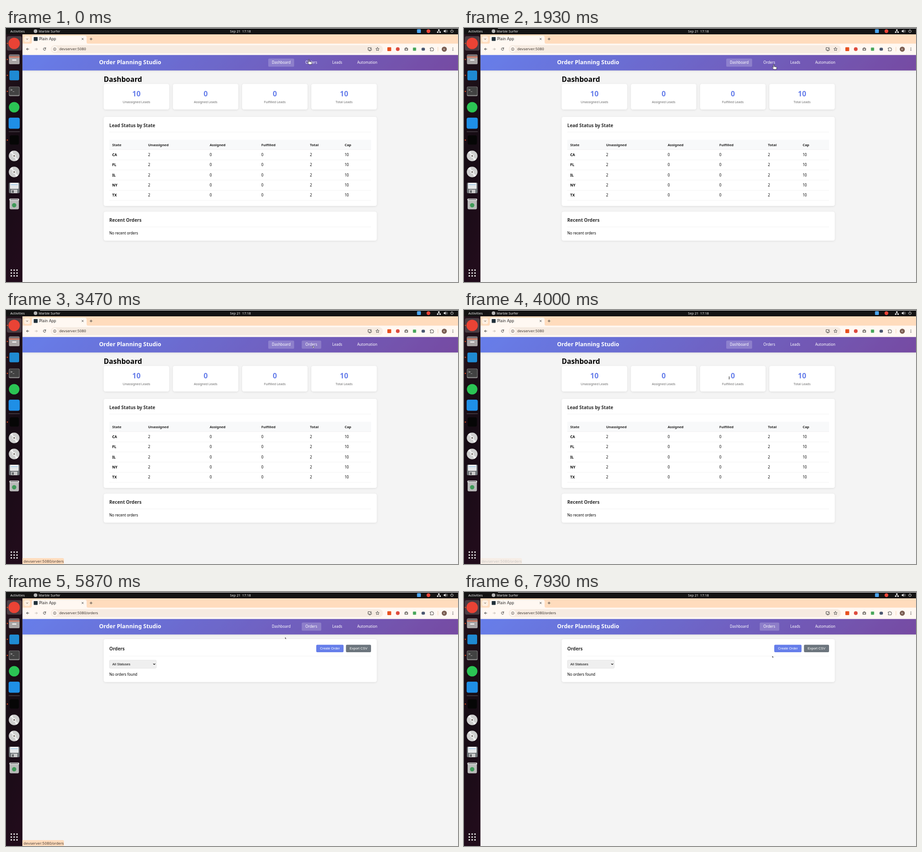
These frames come from a looping animation (998x561 px, 8 s). An HTML page:

```html
<!DOCTYPE html>
<html lang="en">
<head>
<meta charset="utf-8">
<title>Dashboard recording</title>
<style>
  html, body { margin: 0; width: 100%; height: 100%; overflow: hidden; background: #f4f4f4; }
  svg { display: block; width: 100%; height: 100%; }
  text { font-family: "Noto Sans", "Open Sans", sans-serif; white-space: pre; }
  .ui { font-family: "DejaVu Sans", sans-serif; }
  .form { font-family: "Liberation Sans", Arial, sans-serif; }
  .line { fill: none; stroke-linecap: round; stroke-linejoin: round; }
</style>
</head>
<body>
<svg id="stage" viewBox="0 0 998 561" preserveAspectRatio="none"></svg>
<script>
const HOST = 'devserver:5080';
const LOOP = 8000;
const PAGE_SWITCH = 5200;

// ---- drawing helpers ----
const rect = (x, y, w, h, fill, r = 0, extra = '') =>
  `<rect x="${x}" y="${y}" width="${w}" height="${h}" rx="${r}" fill="${fill}" ${extra}/>`;
const circle = (x, y, r, fill, extra = '') =>
  `<circle cx="${x}" cy="${y}" r="${r}" fill="${fill}" ${extra}/>`;
const line = (d, stroke, width = 1) =>
  `<path class="line" d="${d}" stroke="${stroke}" stroke-width="${width}"/>`;
const text = (x, y, size, str, fill = '#000', extra = '') =>
  `<text x="${x}" y="${y}" font-size="${size}" fill="${fill}" ${extra}>${str}</text>`;
const BOLD = 'font-weight="700"';
const MIDDLE = 'text-anchor="middle"';
const rule = y => rect(228, y, 578, 0.6, '#e9e9e9');
const card = (x, y, w, h) => rect(x, y, w, h, '#fff', 4.2, 'filter="url(#soft)"');

const defs = `<defs>
  <linearGradient id="head" gradientUnits="userSpaceOnUse" x1="268" y1="-172.5" x2="766.3" y2="325.8">
    <stop stop-color="#667eea"/><stop offset="1" stop-color="#764ba2"/></linearGradient>
  <linearGradient id="dock" x1="0" y1="0" x2="0.15" y2="1">
    <stop stop-color="#24131c"/><stop offset=".5" stop-color="#160c14"/><stop offset="1" stop-color="#210c1b"/></linearGradient>
  <filter id="soft" x="-10%" y="-20%" width="120%" height="150%">
    <feDropShadow dx="0" dy="1" stdDeviation="2.2" flood-color="#000" flood-opacity=".1"/></filter>
</defs>`;

function topBar() {
  return rect(0, 0, 998, 14, '#131313') + rect(75, 0, 923, 1, '#fff') +
    text(9.5, 9.8, 7.7, 'Activities', '#eee') +
    circle(65.2, 7, 4, '#b5b5b5') +
    text(72, 9.8, 7.4, 'Marble Surfer', '#eee') +
    text(517.5, 9.6, 7.4, 'Sep 21\u00a0 17:18', '#eee', MIDDLE) +
    rect(907.5, 2.5, 8.5, 8.5, '#4aa5ef', 1.5) + circle(932.7, 7, 4.2, '#ea4335') +
    rect(954, 3, 3.4, 2.8, '#eee') + rect(951.6, 8, 3.2, 2.6, '#eee') + rect(956.8, 8, 3.2, 2.6, '#eee') +
    line('M955.7 5.5V7M953.2 8V7H958.4V8', '#eee', 0.7) +
    `<path d="M966.5 5.4h1.8l2.3-2.2v7.4l-2.3-2.2h-1.8z" fill="#eee"/>` +
    line('M972 5.2q1.4 1.7 0 3.4M973.3 3.8q2.6 3.1 0 6.2', '#ccc', 0.7) +
    line('M982.8 4.6a3 3 0 1 0 3.6 0M984.6 3.2v3.4', '#eee', 0.9);
}

function dock() {
  const disc = y => circle(18, y, 11.8, '#cfcfcf') +
    `<path d="M18 ${y}L9 ${y - 7.5}A11.8 11.8 0 0 1 14 ${y - 11}zM18 ${y}L27 ${y + 7.5}A11.8 11.8 0 0 1 22 ${y + 11}z" fill="#eee"/>` +
    circle(18, y, 3.6, '#f3f3f3') + circle(18, y, 1.6, '#4a4038');
  let s = rect(0, 14, 36.3, 547, 'url(#dock)') +
    rect(2, 18, 32.5, 32, '#4a3d43', 4) + circle(18, 34, 12.6, '#ea4335');
  s += rect(6.5, 58.5, 23.5, 21.5, '#a9a5a5', 2.5) + rect(6.5, 58.5, 23.5, 7, '#7c7476', 2.5) +
    rect(6.5, 63, 23.5, 2.2, '#e8795a') + rect(13.5, 69.5, 9.5, 2.6, '#f2f2f2', 1);
  s += rect(7.5, 94, 21.5, 21.5, '#1f8ad2', 3);
  s += rect(6.5, 129.5, 23.5, 21, '#8c8c8c', 2.5) + rect(7.4, 130.3, 21.7, 18, '#424242', 2) +
    text(9, 138.5, 7, '&gt;_', '#f4f4f4', 'class="ui"');
  s += circle(18, 175, 11.6, '#2bc454') + rect(5.8, 198, 24.6, 24.6, '#1f8fe6', 4) +
    rect(6, 228.6, 24.5, 0.8, '#777076') + rect(8, 237, 20.5, 20.5, '#060606', 4);
  s += disc(282.5) + disc(318);
  s += rect(6.5, 341.5, 23.5, 23.5, '#6f7478', 2.5) + rect(9, 342, 18.5, 13, '#f3f3f3', 1) +
    [345.5, 348.5, 351.5].map((y, i) => rect(10.5, y, 15.5, 1, i ? '#c5cdd3' : '#5ea4d8')).join('') +
    rect(11.5, 357, 13.5, 8, '#c9c9c9') + rect(13.5, 358.5, 3.5, 5.5, '#55595c');
  s += rect(8, 379, 20.5, 21.5, '#b9bab9', 3) + rect(7.5, 376.8, 21.5, 4.4, '#e2e2e2', 1.5) +
    rect(9.5, 378, 17.5, 1.6, '#6c6c6c') + circle(18, 391.5, 4.8, '#3f9a58');
  for (const y of [34, 69.5, 104.5, 140, 247.5]) s += circle(3, y, 1.3, '#e95420');
  for (let i = 0; i < 9; i++)
    s += rect(10.2 + (i % 3) * 6.3, 533.3 + Math.floor(i / 3) * 6.4, 3, 3, '#f2f2f2', 0.7);
  return s;
}

function browser() {
  const ink = '#4a4038';
  let s = rect(36.3, 14, 961.7, 24, '#ffdcbd') + rect(36.3, 34.5, 961.7, 25, '#fff8f2') +
    rect(40, 18, 13.2, 13, '#fff0e2', 4) + line('M45 23.7l1.7 1.7l1.7-1.7', ink, 1) +
    `<path d="M53 35q4 0 4-4V21q0-4 4-4H174q4 0 4 4V31q0 4 4 4z" fill="#fff8f2"/>` +
    rect(61.2, 20, 8.6, 8.6, '#20303a', 1) +
    text(73.2, 27.1, 8, 'Plain App', '#222', 'class="ui"') +
    line('M167.5 22.6l3.4 3.4m0-3.4l-3.4 3.4M185.2 24.3h5.2M187.8 21.7v5.2', '#333', 0.9);
  s += line('M50.5 46.6H45.4m2.3-2.4l-2.4 2.4l2.4 2.4', '#333', 1) +
    line('M64 46.6h5.1m-2.3-2.4l2.4 2.4l-2.4 2.4', '#c2b8b0', 1) +
    line('M87.4 45a2.7 2.7 0 1 0 .3 2.4M87.7 43.4v1.9h-1.9', '#333', 1) +
    rect(98.8, 38, 733.5, 17.4, '#f6ebe1', 8.7) + circle(107.6, 46.7, 6.6, '#fff8f2') +
    circle(107.6, 46.7, 3, 'none', `stroke="${ink}" stroke-width=".8"`) +
    line('M107.6 46.5v1.7M107.6 45v.1', ink, 0.8) +
    `<text id="url" class="ui" x="117.7" y="49.3" font-size="7.5" fill="#3b342f"></text>` +
    line('M803.5 43.4h-4v5.4h7.6v-1.6M801.5 50.4h3.5M805.6 42.8v3.2m-1.5-1.4l1.5 1.5l1.5-1.5', '#333', 0.9) +
    line('M820.3 42.9l1.1 2.4l2.6.3l-1.9 1.8l.5 2.6l-2.3-1.3l-2.3 1.3l.5-2.6l-1.9-1.8l2.6-.3z', '#333', 0.8);
  s += rect(842, 42.5, 8.5, 8.5, '#e8501e', 1.2) + circle(865, 46.7, 4.1, '#dd4b3e') +
    rect(880, 44.3, 7.6, 5.8, '#77736f', 1) + rect(882, 43, 3.5, 2, '#77736f') +
    circle(883.8, 47.2, 1.6, '#f5eee8') + rect(898.5, 43.3, 7, 7, '#48a65a', 1) +
    rect(917.5, 43.5, 7.5, 6.5, '#4b5870', 2.5) +
    line('M936.9 44.2h2a1.2 1.2 0 0 1 2.4 0h2v2a1.2 1.2 0 0 1 0 2.4v2h-6.4v-2a1.2 1.2 0 0 0 0-2.4z', '#333', 0.9) +
    rect(953.4, 42, 0.8, 9.5, '#f2cba6') + circle(967.7, 46.8, 5.6, '#795c50') +
    text(967.7, 49, 6, 'K', '#fff', MIDDLE);
  for (const y of [44, 46.7, 49.4]) s += circle(986.7, y, 0.8, '#333');
  return s;
}

function siteHeader() {
  const nav = [[587, 'Dashboard'], [661, 'Orders'], [720.5, 'Leads'], [775.5, 'Automation']];
  return rect(36.3, 59.3, 961.7, 34.5, 'url(#head)', 0, 'filter="url(#soft)"') +
    text(205.5, 80.3, 12.4, 'Order Planning Studio', '#fff', BOLD) +
    rect(579, 67.5, 57.2, 18, '#fff', 2.6, 'id="pillDash"') +
    rect(652.9, 67.5, 43.2, 18, '#fff', 2.6, 'id="pillOrders"') +
    nav.map(([x, label]) => text(x, 79.2, 8, label, '#fff')).join('');
}

function dashboardPage() {
  const stats = [['10', 'Unassigned'], ['0', 'Assigned'], ['0', 'Fulfilled'], ['10', 'Total']];
  const columns = [234.5, 313.7, 449.7, 563.8, 671, 747.7];
  let s = text(215.8, 119, 15.6, 'Dashboard', '#000', BOLD);
  stats.forEach(([n, label], i) => {
    const x = 215.8 + i * 152.8, mid = x + 72.2;
    s += card(x, 123.5, 144.4, 56.4) + text(mid, 151.2, 16, n, '#667eea', BOLD + MIDDLE) +
      text(mid, 165.7, 7.1, label + ' Leads', '#666', MIDDLE);
  });
  s += card(215.8, 196.3, 602.8, 196.8) + text(228, 218.6, 10, 'Lead Status by State', '#2c2c2c', BOLD) +
    rule(229.6) + rect(228, 246.8, 578, 22, '#f8f9fa') + rule(268.5);
  ['State', 'Unassigned', 'Assigned', 'Fulfilled', 'Total', 'Cap'].forEach((label, i) =>
    s += text(columns[i], 260.6, 7.8, label, '#222', BOLD));
  ['CA', 'FL', 'IL', 'NY', 'TX'].forEach((state, row) => {
    const y = 283 + row * 22.35;
    [state, 2, 0, 0, 2, 10].forEach((v, i) => s += text(columns[i], y, 8, v, '#000', i ? '' : BOLD));
    s += rule(y + 7.9);
  });
  return s + card(215.8, 405.8, 602.8, 63.7) + text(228, 428, 10, 'Recent Orders', '#2c2c2c', BOLD) +
    rule(438.9) + text(228, 455.5, 8, 'No recent orders');
}

function ordersPage() {
  const button = (x, w, fill, label) => rect(x, 116.4, w, 16.7, fill, 2.3) +
    text(x + w / 2, 127.3, 7.5, label, '#fff', MIDDLE + ' class="form"');
  return card(215.8, 104, 602.8, 94.7) + text(228, 128.5, 10, 'Orders', '#2c2c2c', BOLD) +
    button(685, 60.3, '#667eea', 'Create Order') + button(750.6, 55.4, '#6c757d', 'Export CSV') +
    rule(141.2) + rect(228.3, 150.4, 103.6, 18, '#efefef', 2.2, 'stroke="#d8d8d8" stroke-width=".6"') +
    text(234.8, 162, 7.5, 'All Statuses', '#000', 'class="form"') +
    line('M325.4 158.5l1.9 1.9l1.9-1.9', '#111', 1.1) + text(228, 184.8, 8, 'No orders found');
}

const statusBubble = `<g id="bubble"><path d="M36.3 548h88.5q3.2 0 3.2 3.2V561H36.3z" fill="#ffdcbd"/>` +
  text(38.8, 557.7, 7.8, HOST + '/orders', '#4a3f37', 'class="ui"') + '</g>';

const HAND = 'M1 .8Q2-.3 2.8.8V5l4.6 1q1.4.5 1.1 2L7.8 11.6H2.2L-1.6 7.6Q-1.8 6.2-.4 6.5L1 7.6z';
const cursors = `<g id="cursor">
  <path id="hand" d="${HAND}" fill="#fff" stroke="#222" stroke-width=".8"/>
  <path id="smallHand" d="${HAND}" transform="scale(.4)" fill="#fff" stroke="#222" stroke-width="1.3"/>
  <path id="arrow" d="M0 0V4.4L1.1 3.5L1.9 5L2.7 4.6L2 3.2H3.2z" fill="#333" stroke="#fff" stroke-width=".4"/>
  <path id="beam" class="line" d="M-1 0H1M0 0V4M-1 4H1" stroke="#222" stroke-width=".8"/></g>`;

const stage = document.getElementById('stage');
stage.innerHTML = defs + rect(36, 59, 962, 502, '#f4f4f4') +
  `<g id="dashboard">${dashboardPage()}</g><g id="orders">${ordersPage()}</g>` +
  siteHeader() + browser() + topBar() + dock() + statusBubble + cursors;

// ---- motion ----
const $ = id => document.getElementById(id);
const pointer = [
  [70, 667, 69], [330, 772, 92], [600, 665, 80.5], [1000, 665, 81], [1470, 665, 81],
  [1650, 651, 82], [1930, 682, 80], [2070, 682, 80], [2130, 683, 80], [2270, 683, 78],
  [2600, 683, 75], [3070, 682, 75], [3400, 682, 75], [3930, 585.5, 148], [4330, 585.5, 148],
  [4950, 674, 74], [5070, 673, 73], [5730, 673, 75], [5870, 616, 99.6], [6050, 625, 108],
  [6350, 738, 122], [6530, 719, 126], [7000, 320, 156], [7270, 320, 156], [7400, 323, 156],
  [7600, 323, 156], [7930, 680.5, 140.8]
];
const bubble = [
  [2500, 0], [2600, 0.4], [2730, 1], [3850, 1], [4000, 0.25], [4130, 0],
  [5000, 0], [5070, 0.5], [5200, 1], [6300, 1], [6530, 0]
];
const dashPill = [[PAGE_SWITCH, 0.2], [5470, 0]];
const ordersPill = [[2400, 0], [2730, 0.2], [3430, 0.2], [3730, 0], [4750, 0], [5050, 0.2]];

// Eased values of a keyframe track [time, ...values] at time t.
function at(track, t) {
  const i = track.findIndex(k => k[0] > t);
  if (i < 1) return (i ? track[track.length - 1] : track[0]).slice(1);
  const [a, b] = [track[i - 1], track[i]];
  const p = (t - a[0]) / (b[0] - a[0]), e = p * p * (3 - 2 * p);
  return a.slice(1).map((v, j) => v + (b[j + 1] - v) * e);
}

function pointerShape(t, x, y) {
  if (t < 2270) return 'hand';
  if (x > 652 && x < 697 && y < 86) return 'smallHand';
  if (t < PAGE_SWITCH && y > 135 && y < 170) return 'beam';
  return t > 6200 && x > 684 && y > 116 && y < 133 ? 'smallHand' : 'arrow';
}

function render(now) {
  const t = now % LOOP, onOrders = t >= PAGE_SWITCH;
  const [x, y] = at(pointer, t), shape = pointerShape(t, x, y);
  $('dashboard').style.display = onOrders ? 'none' : '';
  $('orders').style.display = onOrders ? '' : 'none';
  $('url').textContent = HOST + (onOrders ? '/orders' : '');
  $('bubble').setAttribute('opacity', at(bubble, t)[0]);
  $('pillDash').setAttribute('opacity', at(dashPill, t)[0]);
  $('pillOrders').setAttribute('opacity', at(ordersPill, t)[0]);
  $('cursor').setAttribute('transform', `translate(${x} ${y})`);
  for (const id of ['hand', 'smallHand', 'arrow', 'beam'])
    $(id).style.display = id === shape ? '' : 'none';
}

const start = performance.now();
function tick() {
  render(performance.now() - start);
  requestAnimationFrame(tick);
}
tick();
</script>
</body>
</html>
```
